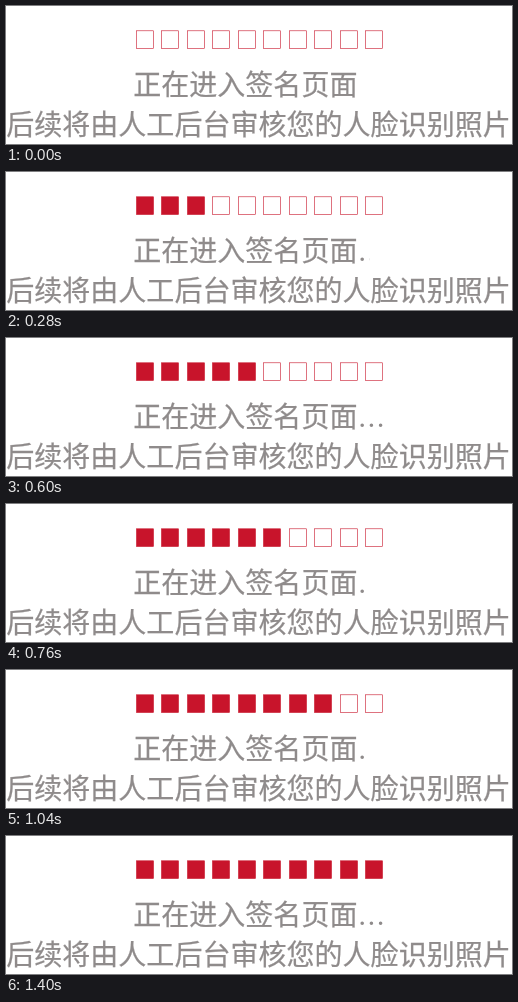
Animation, 506 px wide and 138 px high, one loop 1520 ms. Source, as an HTML page with a canvas:

```html
<!DOCTYPE html>
<html lang="zh-CN">
<meta charset="utf-8">
<style>
  html, body { margin: 0; overflow: hidden; background: #fff; }
  canvas { display: block; }
</style>
<canvas width="506" height="138"></canvas>
<script>
const ctx = document.querySelector('canvas').getContext('2d');
const LOOP = 1520, TICK = 40;
const RED = '#c8142b', GREY = '#8f8b8b';
const fillTimes = [80, 120, 280, 400, 560, 720, 880, 1040, 1160, 1320];

function drawBoxes(t) {
  ctx.fillStyle = ctx.strokeStyle = RED;
  ctx.lineWidth = 0.6;
  fillTimes.forEach((start, i) => {
    const box = [Math.floor(130 + i * 25.5) + 0.5, 24.8, 17, 17.7];
    ctx.strokeRect(...box);
    if (t >= start) ctx.fillRect(...box);
  });
}

function drawLine(text, x, y) {
  ctx.fillText(text, x, y);
  ctx.strokeText(text, x, y);
}

function drawText() {
  ctx.fillStyle = ctx.strokeStyle = GREY;
  ctx.lineWidth = 0.25;
  ctx.font = '28.04px "Noto Sans CJK SC", "Noto Sans CJK", sans-serif';
  drawLine('正在进入签名页面', 127.2, 89);
  drawLine('后续将由人工后台审核您的人脸识别照片', 0.2, 129);
}

// The dots are uncovered from the left, then quickly covered again.
function drawDots(t) {
  const u = (t + 80) % 800;
  const edge = Math.max(348 + 0.043 * u, 372.5 - 0.2375 * u);
  ctx.save();
  ctx.beginPath();
  ctx.rect(348, 80, edge - 348, 12);
  ctx.clip();
  ctx.beginPath();
  for (let i = 0; i < 3; i++) ctx.arc(356.2 + i * 9.2, 87.3, 1.8, 0, 7);
  ctx.fill();
  ctx.restore();
}

function draw() {
  const now = performance.now() % LOOP;
  const t = Math.floor(now / TICK) * TICK;
  ctx.fillStyle = '#fff';
  ctx.fillRect(0, 0, 506, 138);
  drawBoxes(t);
  drawText();
  drawDots(t);
  requestAnimationFrame(draw);
}
draw();
</script>
</html>
```
